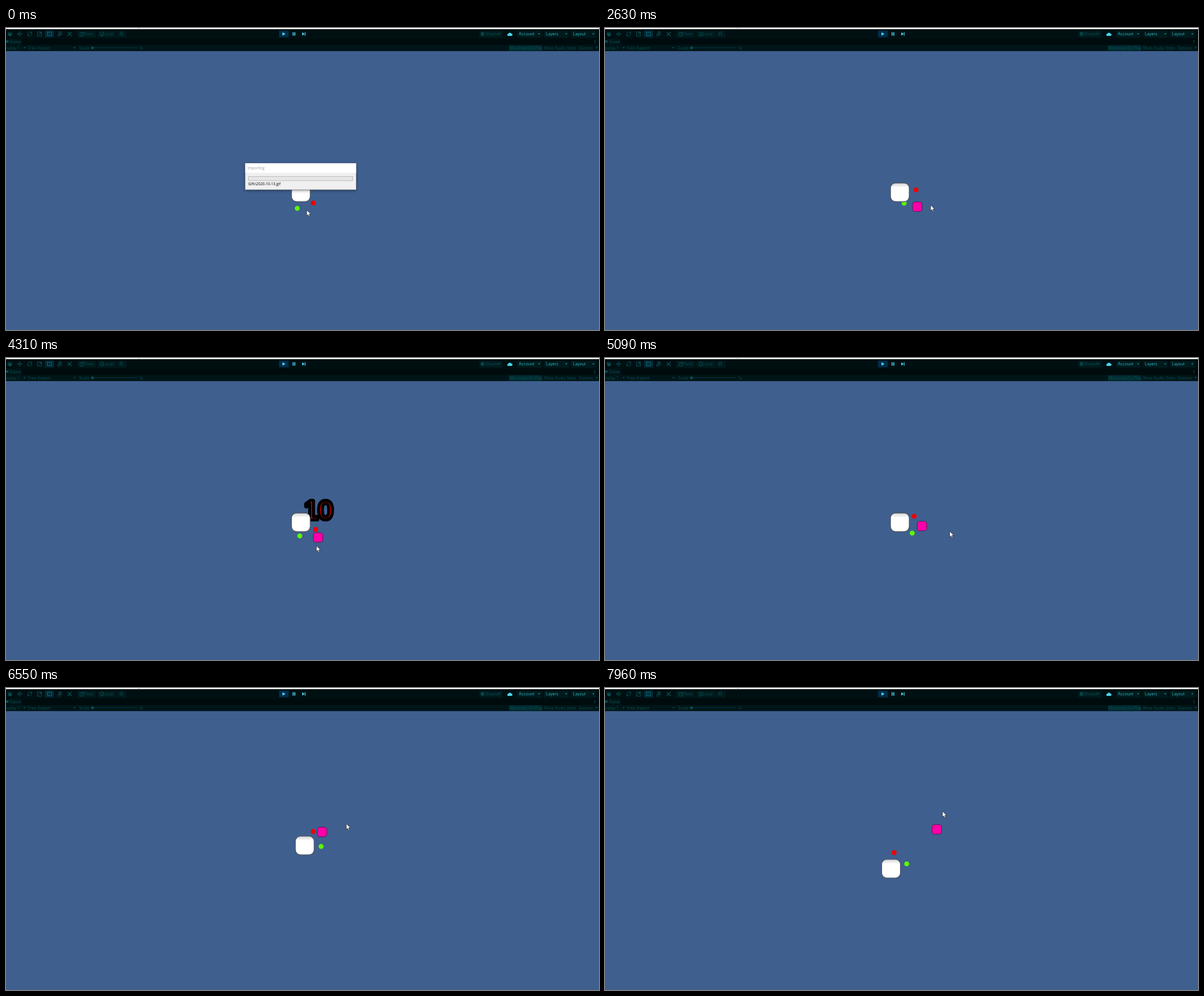
An HTML page for the animation above (7990 ms loop, 1049x534 px).

```html
<!DOCTYPE html>
<html lang="en">
<head>
<meta charset="utf-8">
<title>Punch prototype</title>
<style>
  html, body { margin: 0; width: 100%; height: 100%; overflow: hidden; background: #3f5f8f; }
  svg { display: block; width: 1049px; height: 534px; }
  text { font-family: Inter, "Open Sans", sans-serif; font-size: 7px; white-space: pre; }
  #dim text { fill: #064d53; }
  #menus text { fill: #2eb4c2; }
  #dialog text { font-family: "Open Sans", sans-serif; font-size: 6.5px; }
  #damage text { font: 46px "Liberation Sans", Arial, sans-serif; text-anchor: middle; stroke: #000; stroke-linejoin: round; }
</style>
</head>
<body>
<svg viewBox="0 0 1049 534">
  <defs>
    <linearGradient id="shade" x2="0" y2="1">
      <stop offset="0" stop-color="#cfcfcf"/>
      <stop offset=".24" stop-color="#fff"/>
      <stop offset=".9" stop-color="#fff"/>
      <stop offset="1" stop-color="#e4e4e4"/>
    </linearGradient>
    <filter id="shadow" x="-10%" y="-20%" width="120%" height="150%">
      <feDropShadow dx="0" dy="1.5" stdDeviation="2.5" flood-opacity=".4"/>
    </filter>
    <path id="caret" d="M-2.2-1.2h4.4L0 1.4z"/>
  </defs>

  <!-- Editor bars -->
  <rect width="1049" height="534" fill="#3f5f8f"/>
  <rect width="1049" height="40.6" fill="#001012"/>
  <rect y="19" width="1049" height="11" fill="#000b0d"/>
  <rect y="19" width="28" height="11" fill="#001517"/>
  <rect y="30" width="1049" height="10.6" fill="#001517"/>
  <rect width="1049" height="2" fill="#fff"/>
  <rect x="234" width="2" height="1" fill="#aaa"/>
  <path d="M126 5h33v12h-33zM162 5h33v12h-33zM197 5h16v12h-16zM837 5h41v12h-41z" fill="#001a1c"/>
  <rect x="69" y="4.5" width="16" height="12" fill="#002a38"/>
  <rect x="483" y="4.5" width="17" height="12" fill="#002d4b"/>
  <rect x="890" y="30.5" width="58" height="10" fill="#002b30"/>

  <g fill="none" stroke="#064d53">
    <path d="M4 10V7M6 10V6.5M8 10V7M10 11V8.5M3.5 10.5H10l-1 3.500H5.500z" fill="#064d53"/>
    <path d="M20 10.500h8M24 6.500v8M22.500 8L24 6.500 25.500 8M22.500 13l1.500 1.500 1.500-1.500M21.500 9L20 10.500l1.500 1.500M26.500 9l1.500 1.500-1.500 1.500"/>
    <path d="M38.500 11a3.500 3.500 0 0 1 6-3l1 1M45.500 10a3.500 3.500 0 0 1-6 3l-1-1M45.500 6.500V9H43M38.500 14.500V12H41"/>
    <path d="M55.500 7H63v7.500h-7.500zM57 13l4.500-4.500M59 8.500h2.500V11"/>
    <path d="M73.500 7.500h7v6h-7z" stroke="#12808a" stroke-dasharray="2 1"/>
    <path d="M91.500 12.500v2h2M93.500 7H98v4.500h-4.500zM91 11.500h8M95.500 6v9"/>
    <path d="M109.500 7.500l7 7M116 7l-7 7" stroke-width="1.500"/>
    <path d="M131 8h5.500v6H131zM133 11l4-4M166.500 8.500l3-1.500 3 1.500v4l-3 2-3-2zM169.500 10v4"/>
    <path d="M202 13V9a2 2 0 0 1 4 0v4M202 12h1.500M204.500 12H206"/>
    <path d="M150 35h82" stroke="#053b40"/>
  </g>
  <g id="dim" fill="#064d53">
    <circle cx="153" cy="35" r="2.600"/>
    <path d="M0 22h4.500v4H0z"/>
    <circle cx="843" cy="10.500" r="3.200"/>
    <path d="M841.500 10.500l1.200 1.300 2.300-2.800" fill="none" stroke="#001a1c"/>
    <path d="M1041 21h1.200v6h-1.200z"/>
    <use href="#caret" x="873" y="10.500"/>
    <use href="#caret" x="33" y="35"/>
    <use href="#caret" x="121" y="35"/>
    <use href="#caret" x="1045" y="35"/>
    <text x="138" y="13">Pivot</text>
    <text x="172" y="13">Local</text>
    <text x="847.500" y="13">Shared</text>
    <text x="7" y="27">Game</text>
    <text x="-5.500" y="37.500">Display 1</text>
    <text x="39" y="37.500">Free Aspect</text>
    <text x="129" y="37.500">Scale</text>
    <text x="236" y="37.500">1x</text>
    <text x="890.500" y="37.500">Maximize On Play</text>
    <text x="952" y="37.500">Mute Audio</text>
    <text x="992" y="37.500">Stats</text>
    <text x="1013.500" y="37.500">Gizmos</text>
  </g>
  <g fill="#48d4f0">
    <path d="M489 7.500l5.500 3-5.500 3zM507 7.500h1.700v6H507zM510 7.500h1.700v6H510zM524 7.500l4.200 3-4.200 3zM528.500 7.500h1.300v6h-1.300z"/>
    <path d="M889 14a2 2 0 0 1-.3-4 2.800 2.800 0 0 1 5.200-.2A2.100 2.100 0 0 1 893.800 14z"/>
  </g>
  <g id="menus"></g>

  <!-- Game view -->
  <rect id="enemy" x="-8.500" y="-8.500" width="17" height="17" rx="4.500" fill="#ff00a8" stroke="#49204f"/>
  <g id="damage">
    <text x="-.6" y="16" stroke-width="8">10</text>
    <text x="-.6" y="16" fill="#f00" stroke-width="2.900">10</text>
  </g>
  <circle id="red" r="4.400" fill="#f00000"/>
  <circle id="green" r="4.400" fill="#5cf500"/>
  <rect id="player" x="-16.500" y="-16.500" width="33" height="33" rx="9" fill="url(#shade)" stroke="#4b5159" stroke-width="1.100"/>
  <g id="dialog">
    <rect x="423" y="239" width="196.500" height="47" fill="#f0f0f0" stroke="#59616d" stroke-width=".6" filter="url(#shadow)"/>
    <rect x="423.300" y="239.300" width="196" height="16.700" fill="#fff"/>
    <rect x="429" y="262.500" width="184.500" height="7.500" fill="#e6e6e6" stroke="#bcbcbc"/>
    <text x="427.500" y="250" fill="#999">Importing</text>
    <text x="428.500" y="278" fill="#000">Gifs\2020-10-13.gif</text>
  </g>
  <path id="cursor" d="M0 0v10l2.300-2 1.600 3.500 1.600-.8L4 7.300h3.200z" fill="#fff" stroke="#222" stroke-width=".7"/>
</svg>
<script>
const LOOP = 7990, DIALOG_END = 750;
const SPREAD = 31 * Math.PI / 180, REACH = 29;
const HOME = [521.6, 290.6];
const el = id => document.getElementById(id);

el("menus").innerHTML = ["Account", "Layers", "Layout"].map((name, i) => {
  const x = 904 + i * 48;
  return `<rect x="${x}" y="5" width="43" height="12" fill="#001a1c"/>
    <text x="${x + 3}" y="13">${name}</text>
    <use href="#caret" x="${x + 39}" y="10.5" fill="#117983"/>`;
}).join("");

// Waypoints: [time, x, y]
const paths = {
  player: [[920, ...HOME], [1120, 488, 281], [1350, 510, 268], [1650, ...HOME], [6140, ...HOME],
    [6550, 528.5, 278.5], [6910, 528, 276], [7780, 494, 299], [7960, 506, 319.5]],
  enemy: [[1350, 608, 251.5], [2630, 552.5, 316], [4600, 552, 317.5], [5280, 564, 289.5],
    [5810, 564, 289.5], [6550, 559, 254.5], [7000, 559, 257], [7960, 587, 250]],
  cursor: [[920, 532, 322], [1260, 560, 200], [1730, 592, 262], [2630, 576, 313],
    [4310, 549, 332], [4950, 612, 312], [5810, 599, 278], [6550, 602, 240], [7960, 597, 218]]
};

// Fists alternate, green first; a landed punch throws a number a moment later
const punches = [2730, 3661, 4480, 5130, 6820];
const MISS = 2, DELAY = 180, LIFE = 610;

function at(path, t) {
  const i = path.findIndex(p => p[0] > t);
  if (i < 1) return path.at(i).slice(1);
  const [t0, x0, y0] = path[i - 1], [t1, x1, y1] = path[i];
  const f = (t - t0) / (t1 - t0);
  return [x0 + (x1 - x0) * f, y0 + (y1 - y0) * f];
}

// Pull back, then thrust
function jab(s) {
  const u = (s + 200) / 340;
  return u > 0 && u < 1 ? -11 * Math.sin(2 * Math.PI * u) : 0;
}

const put = (id, x, y) => el(id).setAttribute("transform", `translate(${x.toFixed(2)} ${y.toFixed(2)})`);
const show = (id, on) => el(id).setAttribute("visibility", on ? "visible" : "hidden");

function draw(t) {
  for (const id in paths) put(id, ...at(paths[id], t));

  const [px, py] = at(paths.player, t), [cx, cy] = at(paths.cursor, t);
  const aim = Math.atan2(cy - py, cx - px);
  ["green", "red"].forEach((id, n) => {
    const a = aim + (n ? -SPREAD : SPREAD);
    const push = punches.reduce((sum, time, i) => i % 2 === n ? sum + jab(t - time) : sum, 0);
    put(id, px + REACH * Math.cos(a) + push * Math.cos(aim),
            py + REACH * Math.sin(a) + push * Math.sin(aim));
  });

  const age = time => t - time - DELAY;
  const hit = punches.find((time, i) => i !== MISS && age(time) >= 0 && age(time) < LIFE);
  show("damage", hit);
  if (hit) {
    const [x, y] = at(paths.enemy, hit + DELAY), s = age(hit) / 1000;
    put("damage", x + 1, y - 620 * s + 1103 * s * s);
  }
  show("dialog", t < DIALOG_END);
}

const start = performance.now();
function tick() {
  draw((performance.now() - start) % LOOP);
  requestAnimationFrame(tick);
}
tick();
</script>
</body>
</html>
```
